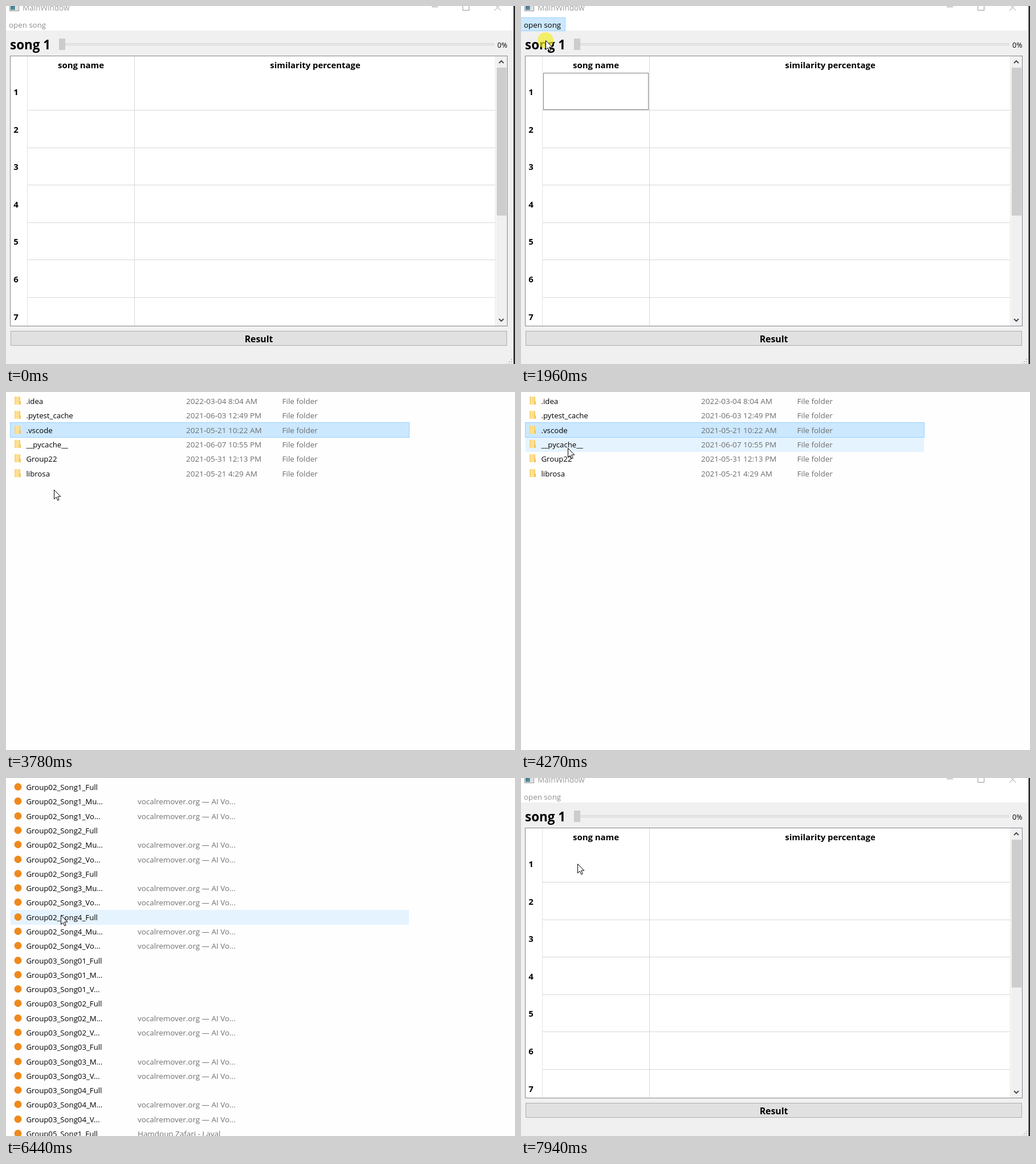
Animation of 893x627 px, one loop 7.99 s. Source, as an HTML page with a canvas:

```html
<!DOCTYPE html>
<html lang="en">
<head>
<meta charset="utf-8">
<title>Song picker</title>
<style>
  html, body { margin: 0; width: 100%; height: 100%; overflow: hidden; background: #fff; }
  canvas { display: block; width: 893px; height: 627px; }
</style>
</head>
<body>
<canvas id="stage" width="893" height="627"></canvas>
<script>
const W = 893, H = 627, LOOP = 7990;
const ctx = document.getElementById('stage').getContext('2d');
const FONT = '"Open Sans", "Noto Sans", sans-serif';
const ROW = 25.28;

// Pointer tip: time, x, y
const path = [
  [70, 279, 260], [400, 279, 260], [800, 33, 28], [1020, 33, 28], [1400, 36, 40],
  [1770, 43, 60], [2900, 43, 60], [3150, 66, 77], [3640, 84, 171], [3780, 84, 171],
  [4270, 82, 98], [4540, 82, 98], [4820, 88, 173], [5230, 88, 173], [5240, 88, 127],
  [6050, 88, 127], [6440, 96, 240], [6870, 99, 150], [LOOP, 99, 150]
];

// Click halo: start, fade start, end
const clicks = [[1830, 2170, 2310], [5240, 5640, 5640], [7470, 7810, 7860]];

const folders = [
  ['.idea', '2022-03-04 8:04 AM'],
  ['.pytest_cache', '2021-06-03 12:49 PM'],
  ['.vscode', '2021-05-21 10:22 AM'],
  ['__pycache__', '2021-06-07 10:55 PM'],
  ['Group22', '2021-05-31 12:13 PM'],
  ['librosa', '2021-05-21 4:29 AM']
];

const songs = [];
for (const [group, pad, tails] of [['02', '', ['Mu...', 'Vo...']], ['03', '0', ['M...', 'V...']]]) {
  for (let n = 1; n <= 4; n++) {
    for (const tail of ['Full', ...tails]) {
      const plain = tail === 'Full' || (group === '03' && n === 1);
      songs.push([`Group${group}_Song${pad}${n}_${tail}`, plain ? '' : 'vocalremover.org — AI Vo...']);
    }
  }
}
songs.push(['Group05_Song1_Full', 'Hamdoun Zafari - Layal']);

const between = (t, a, b) => t >= a && t < b;
const clamp = v => Math.max(0, Math.min(1, v));
const rowTop = i => Math.floor(3 + i * ROW);

function rect(x, y, w, h, fill, stroke) {
  if (fill) { ctx.fillStyle = fill; ctx.fillRect(x, y, w, h); }
  if (stroke) {
    ctx.strokeStyle = stroke;
    ctx.lineWidth = 1;
    ctx.strokeRect(x + .5, y + .5, w - 1, h - 1);
  }
}

function text(s, x, y, size, color = '#000', weight = 400, align = 'left') {
  ctx.font = `${weight} ${size}px ${FONT}`;
  ctx.textAlign = align;
  ctx.fillStyle = color;
  ctx.fillText(s, x, y);
}

function line(points, color, width = 1) {
  ctx.beginPath();
  points.forEach(([x, y]) => ctx.lineTo(x, y));
  ctx.strokeStyle = color;
  ctx.lineWidth = width;
  ctx.stroke();
}

function pointerAt(t) {
  let i = 1;
  while (i < path.length - 1 && path[i][0] <= t) i++;
  const [t0, x0, y0] = path[i - 1], [t1, x1, y1] = path[i];
  const p = clamp((t - t0) / (t1 - t0)), e = p * p * (3 - 2 * p);
  return { x: x0 + (x1 - x0) * e, y: y0 + (y1 - y0) * e };
}

function drawTitleBar(t) {
  const active = between(t, 1020, 1960), open = between(t, 790, 2600);
  const ink = active ? '#000' : '#999';
  rect(0, 0, W, 43, '#fff');
  rect(6, -6, 17, 15, '#f4f4f4', '#8c8c8c');
  const g = ctx.createLinearGradient(8, 0, 15, 7);
  g.addColorStop(0, '#3c7391');
  g.addColorStop(1, '#5f9a9b');
  rect(8, -2, 8, 9, g);
  rect(17, -2, 4, 9, '#dcdcdc');
  text('MainWindow', 29, 7.5, 13.55, ink);
  line([[747, 1.5], [758, 1.5]], ink);
  rect(801, -4, 12, 12, null, ink);
  line([[857, -3], [868, 8]], ink);
  line([[868, -3], [857, 8]], ink);
  if (open) rect(-1, 20, 79, 24, '#cce8ff', '#99d1ff');
  text('open song', 5, 37.5, 13.3, open || active ? '#000' : '#8d8d8d');
}

function drawTable(t) {
  rect(7, 87, 873, 474, '#fff', '#828790');
  for (let i = 0; i < 7; i++) {
    const y = 182 + Math.round(i * 65.6);
    if (i < 6) rect(38, y, 820, 1, '#d8d8d8');
    text(i + 1, 17.5, y - 26, 14.9, '#000', 700, 'center');
  }
  rect(37, 88, 1, 472, '#e3e3e3');
  rect(225, 88, 1, 472, '#d8d8d8');
  rect(858, 88, 1, 472, '#e3e3e3');
  text('song name', 131.5, 109, 14.9, '#000', 700, 'center');
  text('similarity percentage', 542.5, 109, 14.9, '#000', 700, 'center');
  if (between(t, 1020, 2600)) {
    ctx.setLineDash([1, 1]);
    rect(39, 117, 185, 65, null, '#000');
    ctx.setLineDash([]);
  }
  rect(860, 88, 19, 472, '#f0f0f0');
  rect(861, 108, 17, 259, '#cdcdcd');
  line([[865, 100], [869, 96], [873, 100]], '#404040', 1.8);
  line([[865, 548], [869, 552], [873, 548]], '#404040', 1.8);
}

function drawWindow(t) {
  rect(0, 0, W, H, '#f0f0f0');
  drawTitleBar(t);
  text('song 1', 7, 76, 22.4, '#000', 700);
  rect(93, 65, 763, 4, '#e7eaea', '#d6d6d6');
  rect(93, 57, 11, 20, '#cccccc');
  text('0%', 862, 72.5, 12.5);
  drawTable(t);
  rect(8, 569, 871, 26, '#e1e1e1', '#adadad');
  text('Result', 443.5, 588.5, 15.8, '#000', 700, 'center');
  for (let i = 0; i < 3; i++) {
    for (let j = 0; j <= i; j++) rect(886 - j * 4, 618 + i * 4, 2, 2, '#bfbfbf');
  }
  rect(890, 0, 1, H, '#777');
  rect(891, 0, 2, H, '#262626');
}

function drawFolder(y) {
  rect(15, y - 8, 10, 14, '#ffe08f');
  rect(23, y - 7, 2, 8, '#f6cd6c');
  rect(23, y, 3, 6, '#f3c65f');
  rect(15, y - 8, 2, 14, '#f8d67f');
}

function drawDialog(t, pointer) {
  rect(0, 0, W, H, '#fefefe');
  const inside = t >= 5900, rows = inside ? songs : folders;
  const hover = Math.floor((pointer.y - 3.5) / ROW);
  const selected = inside ? (t >= 7470 ? 5 : -1) : (t >= 5240 ? 4 : 2);
  if (hover < rows.length) rect(8, rowTop(hover) + 1, 699, 26, '#e5f3ff');
  if (selected >= 0) rect(7, rowTop(selected), 701, 27, '#cce8ff', '#99d1ff');
  rows.forEach(([name, info], i) => {
    const y = Math.round(16.2 + i * ROW), base = y + 5;
    text(name, 35.5, base, 13.2);
    if (inside) {
      ctx.beginPath();
      ctx.arc(21, y - .5, 6.5, 0, 7);
      ctx.fillStyle = '#ee8a1d';
      ctx.fill();
      if (t >= 6100) text(info, 231, base, 13.42, '#707070');
    } else {
      drawFolder(y);
      text(info, 316, base, 13.5, '#6d6d6d');
      text('File folder', 484.5, base, 13.5, '#6d6d6d');
    }
  });
}

function drawPointer(t, { x, y }) {
  for (const [start, fade, end] of clicks) {
    if (!between(t, start, end)) continue;
    ctx.globalAlpha = t < fade ? 1 : 1 - (t - fade) / (end - fade);
    ctx.beginPath();
    ctx.arc(x, y, 14, 0, 7);
    ctx.fillStyle = 'rgba(245, 238, 40, .68)';
    ctx.fill();
    ctx.globalAlpha = 1;
  }
  const shape = [[0, 0], [0, 16], [3.7, 12.6], [6.2, 18.3], [8.6, 17.3], [6.2, 11.6], [11.3, 11.6]];
  ctx.beginPath();
  shape.forEach(([dx, dy]) => ctx.lineTo(Math.round(x) + .5 + dx, Math.round(y) + .5 + dy));
  ctx.closePath();
  ctx.fillStyle = '#fff';
  ctx.fill();
  ctx.strokeStyle = '#000';
  ctx.lineWidth = 1;
  ctx.stroke();
}

function draw(t) {
  const pointer = pointerAt(t);
  const shown = clamp((t - 2460) / 320) * clamp((7930 - t) / 130);
  if (shown < 1) drawWindow(t);
  if (shown > 0) {
    ctx.globalAlpha = shown;
    drawDialog(t, pointer);
    ctx.globalAlpha = 1;
  }
  if (t >= 70) drawPointer(t, pointer);
}

const began = performance.now();
function tick() {
  draw((performance.now() - began) % LOOP);
  requestAnimationFrame(tick);
}
draw(0);
requestAnimationFrame(tick);
</script>
</body>
</html>
```
